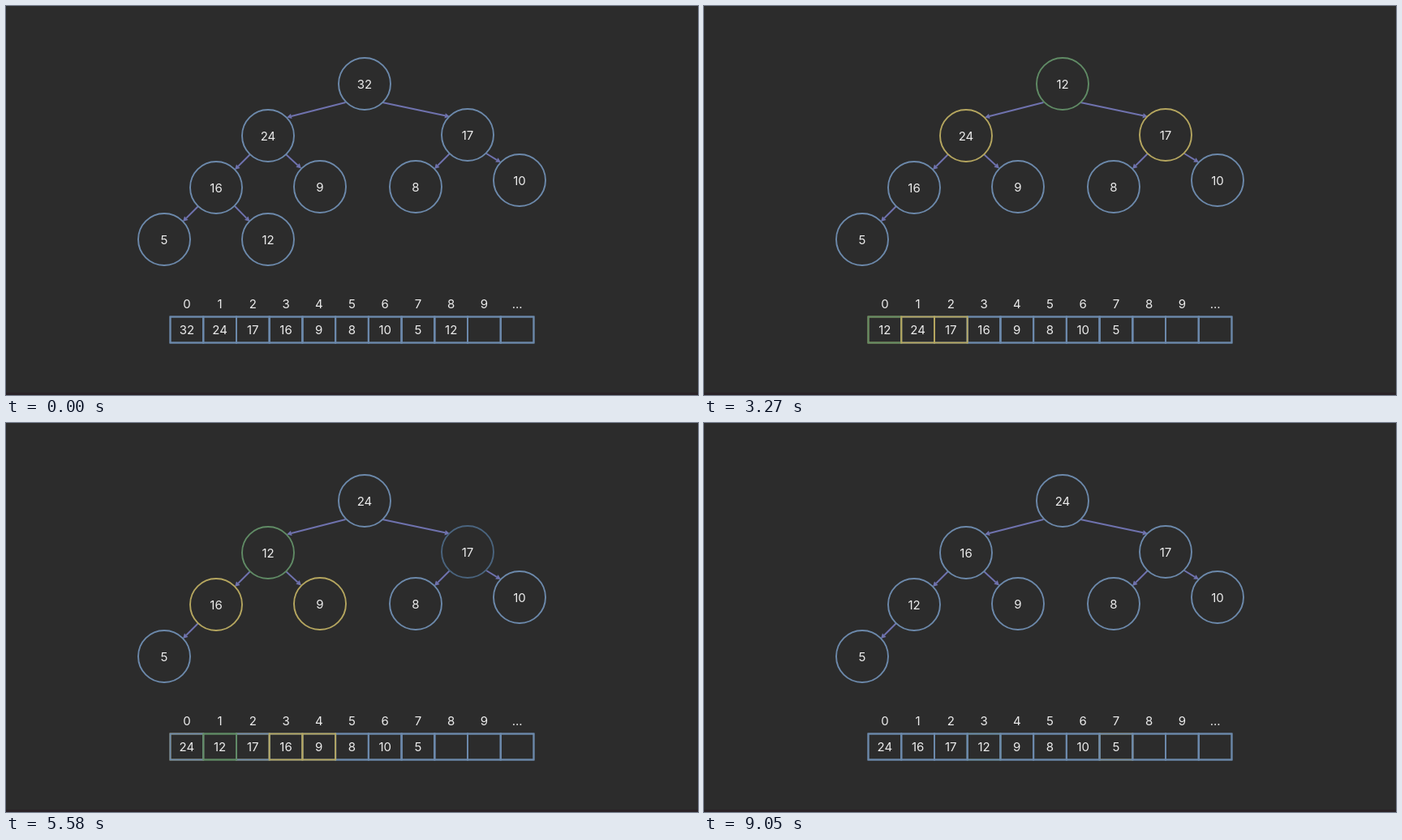
An HTML page with a canvas for the animation above (9780 ms loop, 853 by 480 pixels).

```html
<!DOCTYPE html>
<html lang="en">
<head>
<meta charset="utf-8">
<title>Heap: remove the maximum</title>
<style>
  html, body { margin: 0; width: 100%; height: 100%; overflow: hidden; background: #2c2c2c; }
  canvas { display: block; }
</style>
</head>
<body>
<canvas id="stage" width="853" height="480"></canvas>
<script>
const ctx = document.getElementById('stage').getContext('2d');

const LOOP = 9780, STEP = 60;
const COLORS = {
  b: [108, 137, 171], y: [181, 166, 95], g: [96, 139, 101], r: [176, 88, 84],
  d: [74, 100, 126]
};
const PURPLE = '#6f72ae', WHITE = '#ececec';

// Tree slots in heap order, and the arrow that leads to each slot
const SLOTS = [[442, 96], [323, 160], [569, 159], [259, 224], [387, 223],
  [505, 223], [633, 215], [195, 288], [323, 288]];
const ARROWS = [null, [418.5, 119, 346, 137.5], [464, 119, 547, 136.5],
  [301, 183, 282, 202], [345, 183, 364, 200.5], [547, 182, 528, 201],
  [592, 182, 610, 193], [237, 247, 218, 266], [282, 247, 300.5, 266]];
const RADIUS = 32;
const TABLE = { x: 202.5, y: 383.5, w: 448 / 11, h: 32, count: 11 };

const FULL = [32, 24, 17, 16, 9, 8, 10, 5, 12];
const MOVED = [12, 24, 17, 16, 9, 8, 10, 5];
const SIFTED = [24, 12, 17, 16, 9, 8, 10, 5];
const DONE = [24, 16, 17, 12, 9, 8, 10, 5];

// Each state begins its transition at `at`; `marks` holds a colour key per slot
const STATES = [
  { at: -LOOP, values: FULL, marks: 'bbbbbbbbb' },
  { at: 600, values: FULL, marks: 'rbbbbbbby' },
  { at: 1760, values: MOVED, marks: 'ybbbbbbb' },
  { at: 2910, values: MOVED, marks: 'gyybbbbb' },
  { at: 4070, values: SIFTED, marks: 'ygybbbbb' },
  { at: 5220, values: SIFTED, marks: 'bgdyybbb' },
  { at: 6380, values: DONE, marks: 'bybgybbb' },
  { at: 7530, values: DONE, marks: 'bbbgbbby' },
  { at: 8690, values: DONE, marks: 'bbbbbbbb' }
];

const clamp = v => Math.min(1, Math.max(0, v));
const ease = v => (1 - Math.cos(Math.PI * clamp(v))) / 2;
const mix = (a, b, p) => a + (b - a) * p;
const rgb = c => `rgb(${c.join(',')})`;
const mixColor = (a, b, p) => rgb(COLORS[a].map((v, i) => mix(v, COLORS[b][i], p)));

function label(text, x, baseline) {
  ctx.fillStyle = WHITE;
  ctx.fillText(text, x, baseline);
}

function drawNode(value, x, y, color, alpha) {
  ctx.globalAlpha = alpha;
  ctx.strokeStyle = color;
  ctx.beginPath();
  ctx.arc(x, y, RADIUS, 0, 2 * Math.PI);
  ctx.stroke();
  label(value, x, y + 5.9);
}

function drawArrow([x1, y1, x2, y2], alpha) {
  const length = Math.hypot(x2 - x1, y2 - y1), head = 6;
  ctx.save();
  ctx.globalAlpha = alpha;
  ctx.strokeStyle = ctx.fillStyle = PURPLE;
  ctx.translate(x1, y1);
  ctx.rotate(Math.atan2(y2 - y1, x2 - x1));
  ctx.beginPath();
  ctx.moveTo(0, 0);
  ctx.lineTo(length - head, 0);
  ctx.stroke();
  ctx.beginPath();
  ctx.moveTo(length, 0);
  ctx.lineTo(length - head, -3.2);
  ctx.lineTo(length - head, 3.2);
  ctx.fill();
  ctx.restore();
}

function drawTree(from, to, u) {
  const p = ease(u), fadeOut = 1 - ease(2 * u), fadeIn = ease(2 * u - 1);

  ARROWS.forEach((arrow, i) => {
    if (!arrow) return;
    const parent = (i - 1) >> 1;
    const steady = [i, parent].every(n => from.values[n] === to.values[n]);
    if (steady) {
      if (i < to.values.length) drawArrow(arrow, 1);
      return;
    }
    if (i < from.values.length) drawArrow(arrow, fadeOut);
    if (i < to.values.length) drawArrow(arrow, fadeIn);
  });

  from.values.forEach((value, i) => {
    const j = to.values.indexOf(value), [x, y] = SLOTS[i];
    if (j < 0) {
      drawNode(value, x, y, rgb(COLORS[from.marks[i]]), fadeOut);
    } else {
      drawNode(value, mix(x, SLOTS[j][0], p), mix(y, SLOTS[j][1], p),
        mixColor(from.marks[i], to.marks[j], p), 1);
    }
  });
  ctx.globalAlpha = 1;
}

// Marked cells are outlined last so that their shared borders win
function drawBorders(marks, alpha) {
  ctx.globalAlpha = alpha;
  for (const key of 'bgyr') {
    ctx.strokeStyle = rgb(COLORS[key]);
    for (let i = 0; i < TABLE.count; i++) {
      const mark = (marks[i] || 'b').replace('d', 'b');
      if (mark === key) ctx.strokeRect(TABLE.x + i * TABLE.w, TABLE.y, TABLE.w, TABLE.h);
    }
  }
  ctx.globalAlpha = 1;
}

function drawTable(from, to, p) {
  drawBorders(from.marks, 1);
  if (p > 0) drawBorders(to.marks, p);
  for (let i = 0; i < TABLE.count; i++) {
    const x = TABLE.x + (i + 0.5) * TABLE.w;
    const before = from.values[i] ?? '', after = to.values[i] ?? '';
    label(i < 10 ? i : '...', x, 373.3);
    if (before === after) {
      label(after, x, 405.2);
    } else {
      ctx.globalAlpha = 1 - p;
      label(before, x, 405.2);
      ctx.globalAlpha = p;
      label(after, x, 405.2);
      ctx.globalAlpha = 1;
    }
  }
}

function render(time) {
  const index = STATES.findLastIndex(s => s.at <= time);
  const to = STATES[index], from = STATES[Math.max(0, index - 1)];
  const step = Math.floor((time - to.at) / STEP) + 1;
  const u = clamp((step + 0.72) / 6.85);

  ctx.fillStyle = '#2c2c2c';
  ctx.fillRect(0, 0, 853, 480);
  ctx.fillStyle = '#2a2327';
  ctx.fillRect(0, 477, 853, 3);
  ctx.lineWidth = 1.9;
  ctx.font = '15px Inter, sans-serif';
  ctx.textAlign = 'center';
  drawTree(from, to, u);
  drawTable(from, to, ease(u));
}

const start = performance.now();
function tick() {
  render((performance.now() - start) % LOOP);
  requestAnimationFrame(tick);
}
tick();
</script>
</body>
</html>
```
